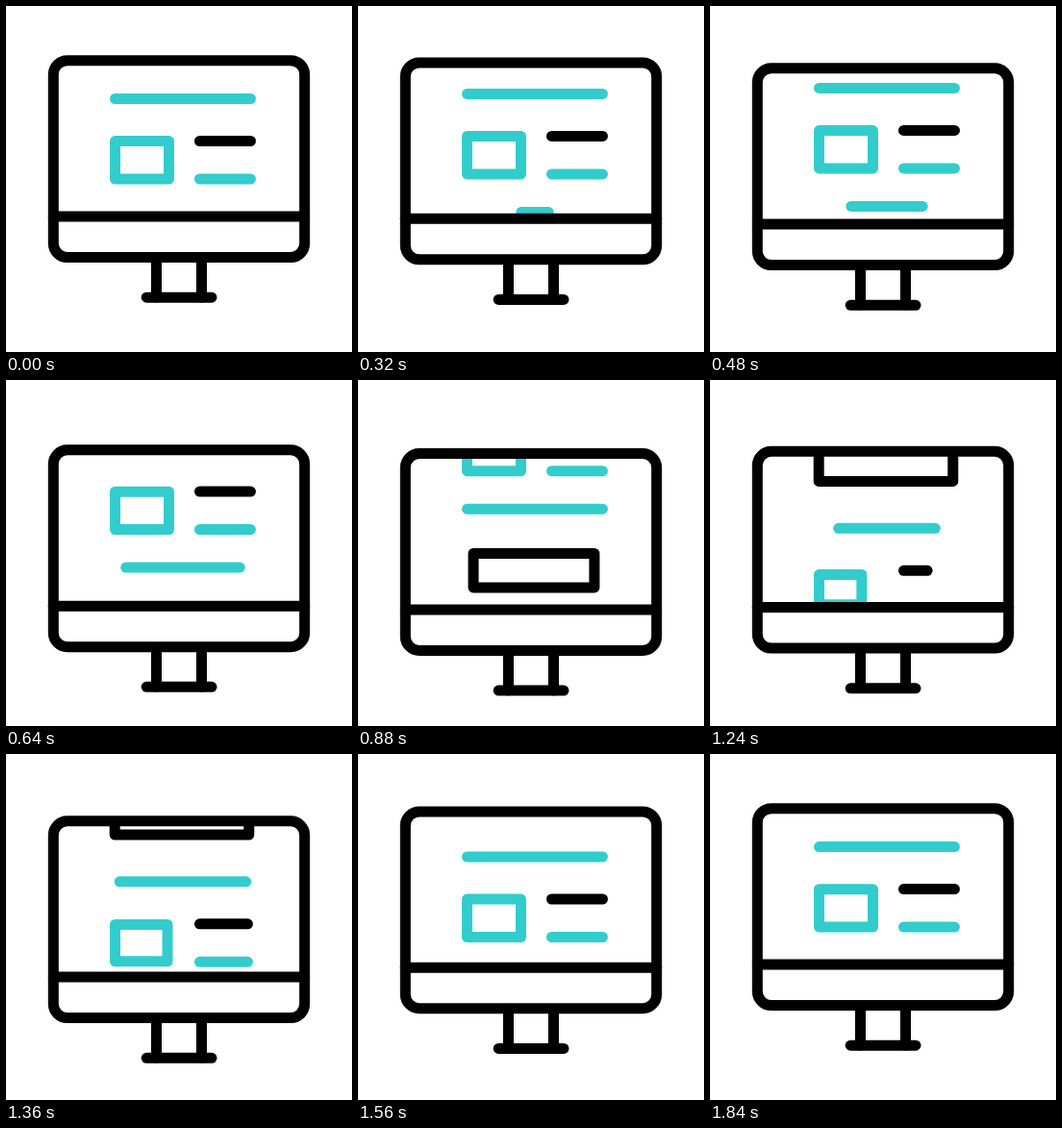
Animation of 360x360 px, one loop 1880 ms. Source, as an HTML page with a canvas:

```html
<!DOCTYPE html>
<html>
<head>
<meta charset="utf-8">
<title>Scrolling monitor</title>
<style>
html, body { margin: 0; width: 100%; height: 100%; overflow: hidden; background: #fff; }
canvas { display: block; }
</style>
</head>
<body>
<canvas id="stage" width="360" height="360"></canvas>
<script>
const ctx = document.getElementById('stage').getContext('2d');
const LOOP = 1880, PAGE = 255.5;
const TEAL = '#33cccc', BLACK = '#000';

const span = (t, from, to) => Math.min(1, Math.max(0, (t - from) / (to - from)));

const smooth = (t, from, to) => {
  const u = span(t, from, to);
  return u * u * (3 - 2 * u);
};

// Cubic Bezier ease (0.65, 0, 0.35, 1), solved by bisection
function ease(t, from, to) {
  const x = span(t, from, to);
  let lo = 0, hi = 1;
  for (let i = 0; i < 24; i++) {
    const s = (lo + hi) / 2, r = 1 - s;
    if (1.95 * s * r * r + 1.05 * s * s * r + s ** 3 < x) lo = s; else hi = s;
  }
  return lo * lo * (3 - 2 * lo);
}

function line(color, x1, y1, x2, y2) {
  ctx.strokeStyle = color;
  ctx.beginPath();
  ctx.moveTo(x1, y1);
  ctx.lineTo(x2, y2);
  ctx.stroke();
}

function box(color, x, y, w, h) {
  ctx.strokeStyle = color;
  ctx.strokeRect(x, y, w, h);
}

// A wide line that grows from its middle
function wideLine(y, grow) {
  if (grow > 0) line(TEAL, 184 - 70.5 * grow, y, 184 + 70.5 * grow, y);
}

// A short line that grows from its left end
function shortLine(color, y, grow) {
  if (grow > 0) line(color, 201.5, y, 201.5 + 53 * grow, y);
}

// Heading, picture frame and two short lines
function section(y, heading, frame, lines) {
  wideLine(y + 96.5, heading);
  if (frame > 0) box(TEAL, 113.5, y + 160.3 - 19.7 * frame, 56 * frame, 39.4 * frame);
  shortLine(BLACK, y + 140.5, lines);
  shortLine(TEAL, y + 180, lines);
}

function page(t) {
  section(0, 1, 1, 1);
  wideLine(219.5, smooth(t, 120, 817));
  const s = smooth(t, 357, 1007);
  if (s > 0) box(BLACK, 183 - 69.8 * s, 283.5 - 19.7 * s, 139.6 * s, 39.4 * s);
  section(PAGE, smooth(t, 843, 1458), smooth(t, 810, 1420), smooth(t, 1090, 1407));
}

function monitor() {
  ctx.strokeStyle = BLACK;
  ctx.beginPath();
  ctx.roundRect(49.3, 56.7, 261.4, 204.8, 14.5);
  ctx.stroke();
  line(BLACK, 49.3, 219, 310.7, 219);
  line(BLACK, 156.5, 262, 156.5, 303);
  line(BLACK, 203.5, 262, 203.5, 303);
  line(BLACK, 146.2, 303.2, 214, 303.2);
}

function draw(t) {
  ctx.fillStyle = '#fff';
  ctx.fillRect(0, 0, 360, 360);
  ctx.lineWidth = 11;
  ctx.lineCap = ctx.lineJoin = 'round';
  ctx.save();
  ctx.translate(0, 20.2 * (ease(t, 30, 1000) - ease(t, 945, LOOP)));
  ctx.save();
  ctx.beginPath();
  ctx.rect(50, 57, 260, 162);
  ctx.clip();
  ctx.translate(0, -PAGE * ease(t, 0, LOOP));
  page(t);
  ctx.restore();
  monitor();
  ctx.restore();
}

const start = performance.now();
function tick() {
  draw((performance.now() - start) % LOOP);
  requestAnimationFrame(tick);
}
tick();
</script>
</body>
</html>
```
